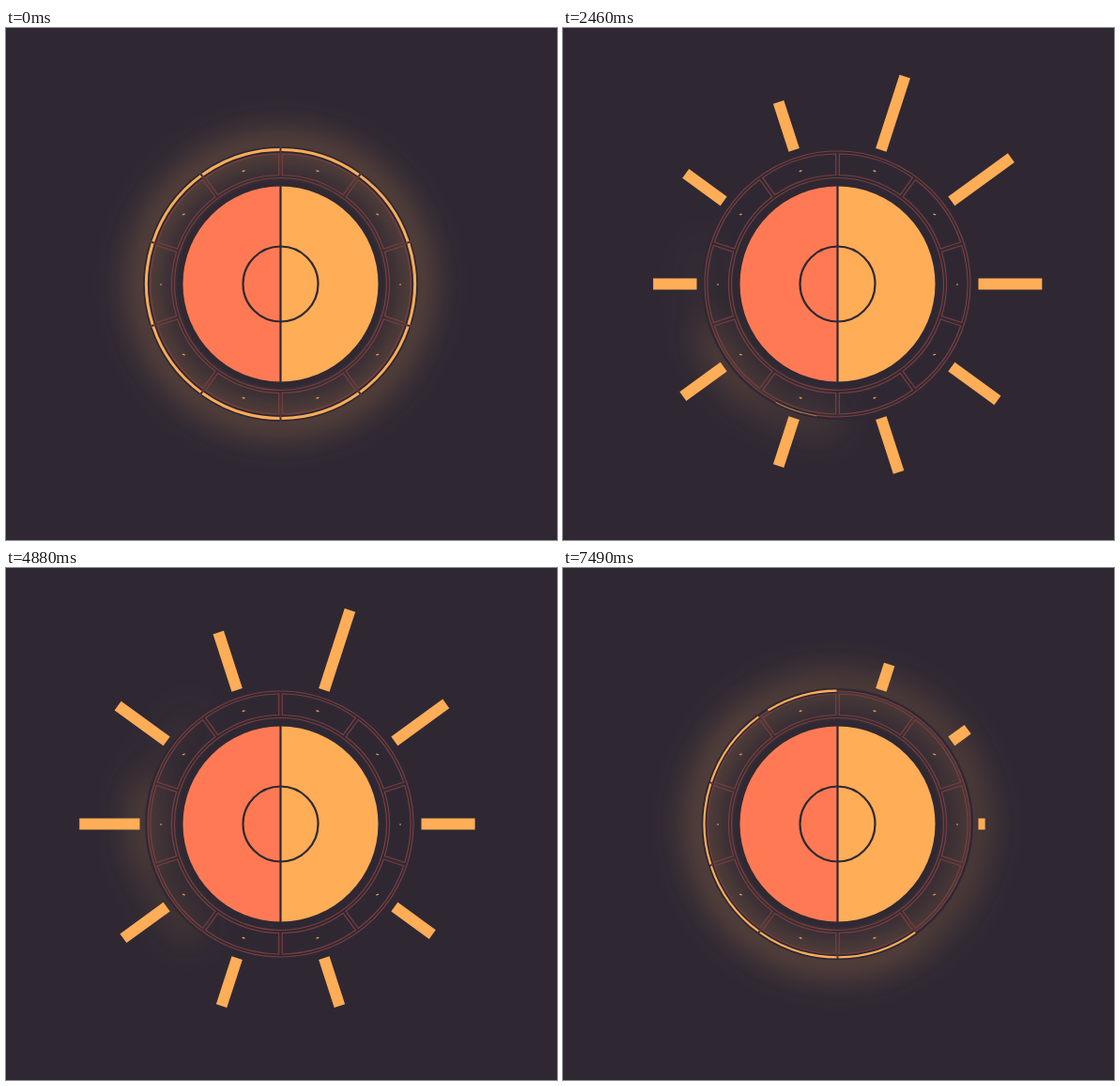
An HTML page for the animation above (7.57 s loop, 587 by 545 pixels).

```html
<!DOCTYPE html>
<html lang="en">
<head>
<meta charset="utf-8">
<title>Sun visualizer</title>
<style>
html, body { margin: 0; width: 100%; height: 100%; overflow: hidden; background: #2f2833; }
svg { display: block; width: 100vw; height: 100vh; }
</style>
</head>
<body>
<svg viewBox="0 0 587 545">
  <defs>
    <filter id="soft" filterUnits="userSpaceOnUse" x="-300" y="-300" width="600" height="600">
      <feGaussianBlur stdDeviation="17"/>
    </filter>
  </defs>
  <rect width="587" height="545" fill="#2f2833"/>
  <g transform="translate(292.5 272.5)" fill="none">
    <g id="glow" filter="url(#soft)" stroke="#ffad57" stroke-width="32"></g>
    <g stroke="#2f2833">
      <circle r="107" stroke-width="6" opacity=".7"/>
      <circle r="143" stroke-width="3"/>
    </g>
    <g id="frame" stroke="#7a3e3f" stroke-width="1.2"></g>
    <g id="marks" fill="#e39a55"></g>
    <g id="lit"></g>
    <g id="bars" stroke="#ffad57" stroke-width="12"></g>
    <path d="M0 -104A104 104 0 0 0 0 104Z" fill="#ff7a54"/>
    <path d="M0 -104A104 104 0 0 1 0 104Z" fill="#ffad57"/>
    <path d="M0 -105V105" stroke="#2f2833" stroke-width="2.2"/>
    <circle r="40" stroke="#2f2833" stroke-width="2.2"/>
  </g>
</svg>
<script>
const LOOP = 7570, START = 390, STEP = 77.17, LAST = 92;
const COUNT = 10, UNIT = 100 / 28, BEAT = 9.7;
const PHRASES = [{ from: 0, fall: 33 }, { from: 49, fall: 83 }];
// Bar that the travelling swell favours, by tick
const SWELL = [[0, 8], [15, 8], [27, 12], [40, 9.5], [58, 8], [75, 14], [LAST, 11.3]];

const $ = id => document.getElementById(id);
const clamp = x => Math.max(0, Math.min(1, x));
const mix = (a, b, p) => a + (b - a) * p;
const rad = deg => deg * Math.PI / 180;
const angle = i => -72 + 36 * i;
const f = x => x.toFixed(2);

function add(parent, tag, attrs = {}) {
  const el = document.createElementNS('http://www.w3.org/2000/svg', tag);
  for (const k in attrs) el.setAttribute(k, attrs[k]);
  parent.appendChild(el);
  return el;
}
const point = (r, deg) => f(r * Math.cos(rad(deg))) + ' ' + f(r * Math.sin(rad(deg)));
const arc = (r, a, b) => `M${point(r, a)}A${r} ${r} 0 0 1 ${point(r, b)}`;

function rand(i, n) {
  const x = Math.sin(i * 127.1 + n * 311.7) * 43758.5453;
  return (x - Math.floor(x)) * 2 - 1;
}
function swell(n) {
  const k = Math.max(1, SWELL.findIndex(([at]) => at >= n));
  const [n0, a] = SWELL[k - 1], [n1, b] = SWELL[k];
  return mix(a, b, (n - n0) / (n1 - n0));
}

// Everything the bars share at one tick
function mood(n) {
  if (n < 0) return { idle: true, calm: 1, fall: 0, spin: 0 };
  const { from, fall: end } = PHRASES[n < PHRASES[1].from ? 0 : 1];
  const m = n - from, fall = 2 * Math.max(0, n - end);
  const phase = (m - 2 + BEAT) % BEAT;
  const turn = 2 * Math.PI * (n - 58) / 26;
  return {
    n, fall,
    calm: clamp((fall - 20) / 8),
    rise: clamp((m + 1) / 3),
    left: clamp(1 - (m + 1) / 4),
    pulse: fall ? 0 : 6 * Math.exp(-phase / 1.6),
    lobe: swell(n),
    center: 112 + 60 * Math.cos(turn),
    spin: fall ? 0 : Math.abs(Math.sin(turn))
  };
}

// Bar height in units; below zero the bar has sunk into the ring.
function level(i, s) {
  const base = 15.7 + 7.5 * Math.exp(-((i / 1.4) ** 2));
  const wave = (2 + s.fall / 10) * Math.cos(rad(36 * (i - s.lobe)));
  const jitter = s.fall ? 0 : .8 * rand(i, s.n);
  return (base + s.pulse + wave + jitter) * s.rise - s.fall;
}
function glowAt(i, s, lit) {
  if (s.idle) return 1;
  const d = Math.abs((angle(i) - s.center + 540) % 360 - 180);
  return Math.max(lit, .8 * clamp(1.25 - d / 42), .8 * clamp((s.fall / 18) ** 3));
}

// Static ring: rims, ten panels and their marks
for (const r of [141.5, 113]) add($('frame'), 'circle', { r });
for (let i = 0; i < COUNT; i++) {
  const a = angle(i) - 18, b = angle(i) + 18;
  const inset = r => 1.8 / rad(r);
  add($('frame'), 'path', {
    d: arc(138.5, a + inset(138.5), b - inset(138.5)) +
       `L${point(116, b - inset(116))}A116 116 0 0 0 ${point(116, a + inset(116))}Z`
  });
  const x = 127.5 * Math.cos(rad(angle(i))), y = 127 * Math.sin(rad(angle(i)));
  const flat = Math.abs(y) < 1;
  add($('marks'), 'ellipse', {
    rx: flat ? 1 : 1.7, ry: .75,
    transform: `translate(${f(x)} ${f(y + .5)}) rotate(${flat ? 0 : -20 * Math.sign(x * y)})`
  });
}

const makeArc = () => ({
  rim: add($('lit'), 'path', { stroke: '#2f2833' }),
  line: add($('lit'), 'path', { stroke: '#ffad57' })
});
function setArc(el, r, width, from, to, opacity) {
  const d = to - from > .5 && opacity > .05 ? arc(r, from, to) : '';
  el.rim.setAttribute('d', d);
  el.line.setAttribute('d', d);
  el.rim.setAttribute('stroke-width', f(width + 3.4));
  el.line.setAttribute('stroke-width', f(width));
  el.line.setAttribute('opacity', f(opacity));
}
const parts = Array.from({ length: COUNT }, (_, i) => ({
  bar: add($('bars'), 'path'),
  lit: makeArc(),
  glow: add($('glow'), 'path', { d: arc(146, angle(i) - 18, angle(i) + 18) })
}));
const glint = makeArc();

let shown = null;
function draw(ms) {
  const t = ms % LOOP;
  let n = t < START ? -1 : Math.min(LAST, Math.floor((t - START + 20) / STEP));
  if (n === 28) n = 27; // one tick is held
  if (n === shown) return;
  shown = n;
  const s = mood(n), r = mix(141.9, 143, s.calm), width = mix(2.2, 3, s.calm);
  parts.forEach((p, i) => {
    const a = angle(i), v = s.idle ? 0 : level(i, s);
    const len = Math.max(0, Math.round(v)) * UNIT;
    const lit = s.idle ? 1 : Math.max(s.left, clamp((-v - .5) / 1.5));
    p.bar.setAttribute('d', len ? `M${point(150, a)}L${point(150 + len, a)}` : '');
    setArc(p.lit, r, width, a + 17.6 - 35.2 * lit, a + 17.6, 1);
    p.glow.setAttribute('opacity', f(.23 * glowAt(i, s, lit)));
  });
  const mid = s.idle ? 0 : s.center - 25;
  setArc(glint, 142, 1.3, mid - 10 * s.spin, mid + 10 * s.spin, .6 * s.spin);
}

const begin = performance.now();
function loop() {
  draw(performance.now() - begin);
  requestAnimationFrame(loop);
}
loop();
</script>
</body>
</html>
```
